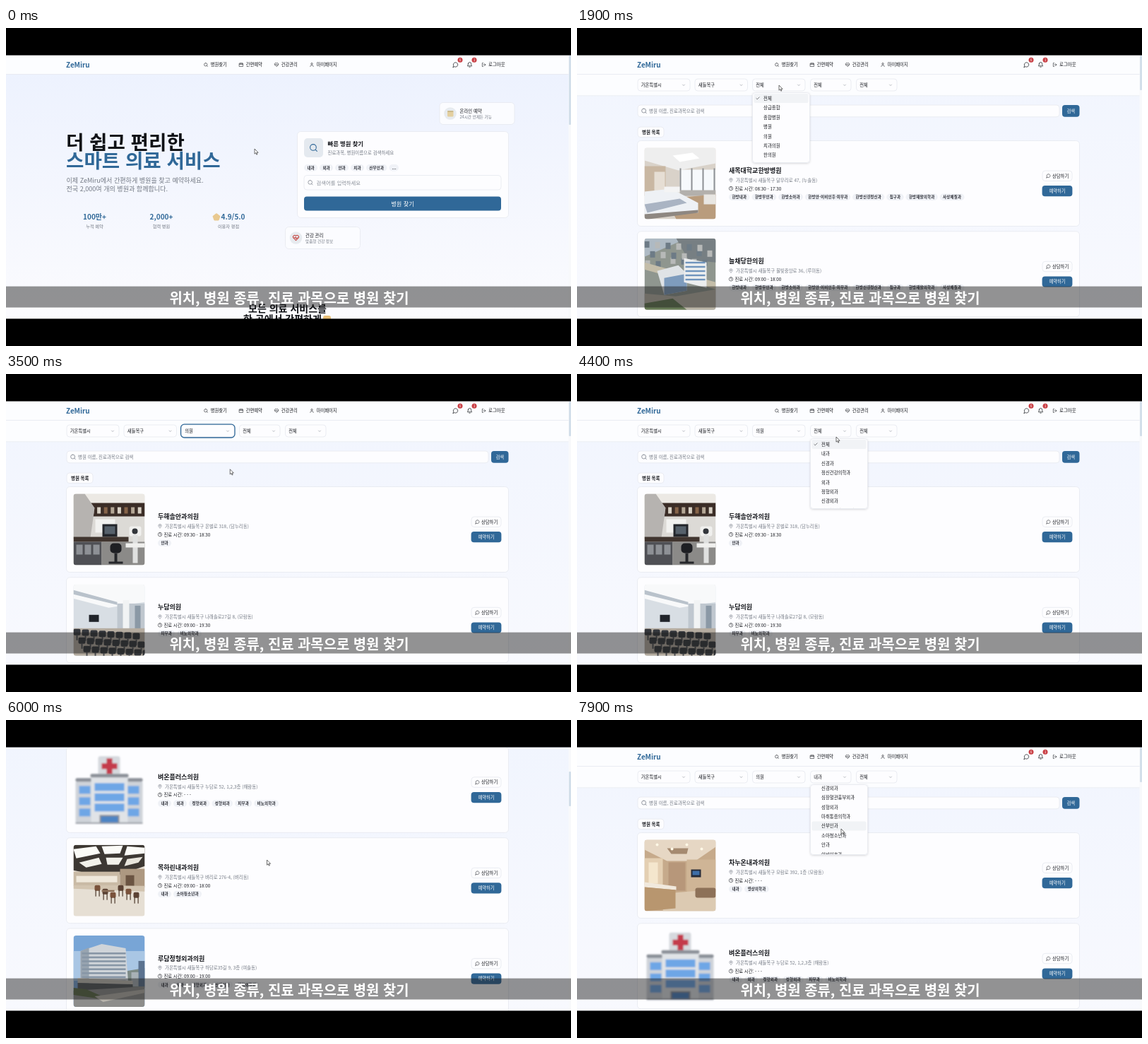
Write an HTML page that moves like this. It is 800 px wide and 450 px high and loops after 8 s.

```html
<!DOCTYPE html>
<html lang="ko">
<head>
<meta charset="utf-8">
<style>
html, body { margin: 0; width: 100%; height: 100%; overflow: hidden; background: #000 }
svg { display: block; font-family: "Noto Sans CJK KR", "Noto Sans CJK", "Noto Sans", sans-serif }
</style>
</head>
<body>
<svg id="stage" width="800" height="450" viewBox="0 0 800 450"></svg>
<script>
const BLUE = '#306898', INK = '#15171c', GREY = '#747a84', LINE = '#e6e9ef';
const PATHS = {
  search: 'M11 3a8 8 0 1 0 0 16a8 8 0 0 0 0-16M21 21l-4.3-4.3',
  cal: 'M3 5h18v16H3zM3 10h18M8 2v5M16 2v5',
  heart: 'M12 21L3 12A5.5 5.5 0 0 1 12 5A5.5 5.5 0 0 1 21 12ZM3 12h5l2-3 3 6 2-3h6',
  user: 'M12 3a4.5 4.5 0 1 0 0 9a4.5 4.5 0 0 0 0-9M4 21v-1a6 6 0 0 1 6-5h4a6 6 0 0 1 6 5v1',
  chat: 'M8 20A9 9 0 1 0 4 16L2 22Z',
  bell: 'M6 8a6 6 0 0 1 12 0c0 7 3 9 3 9H3s3-2 3-9M10 21h4',
  out: 'M9 21H4V3h5M16 17l5-5-5-5M21 12H9',
  clock: 'M12 2a10 10 0 1 0 0 20a10 10 0 0 0 0-20M12 6v6l4 2',
  pin: 'M12 22C7 17 4 13 4 10a8 8 0 0 1 16 0c0 3-3 7-8 12M12 7a3 3 0 1 0 0 6a3 3 0 0 0 0-6',
  down: 'M6 9l6 6 6-6',
  check: 'M4 12l5 5L20 6'
};

const rect = (x, y, w, h, fill, r = 0, more = '') =>
  `<rect x="${x}" y="${y}" width="${w}" height="${h}" rx="${r}" fill="${fill}" ${more}/>`;
const box = (x, y, w, h, r = 4, fill = '#fdfdff') => rect(x, y, w, h, fill, r, `stroke="${LINE}" stroke-width=".8"`);
const poly = (fill, pts) => `<polygon points="${pts}" fill="${fill}"/>`;
const disc = (x, y, r, fill) => `<circle cx="${x}" cy="${y}" r="${r}" fill="${fill}"/>`;
const text = (x, y, s, size, fill = INK, weight = 400, more = '') =>
  `<text x="${x}" y="${y}" font-size="${size}" fill="${fill}" font-weight="${weight}" ${more}>${s}</text>`;
const mid = (x, y, s, size, fill, weight) => text(x, y, s, size, fill, weight, 'text-anchor="middle"');
const icon = (name, x, y, size, color = INK, width = 2) =>
  `<path d="${PATHS[name]}" transform="translate(${x - size / 2} ${y - size / 2}) scale(${size / 24})" fill="none" stroke="${color}" stroke-width="${width}" stroke-linecap="round" stroke-linejoin="round"/>`;
const group = (id, body, more = '') => `<g id="${id}" ${more}>${body}</g>`;
const repeat = (n, f) => Array.from({ length: n }, (_, i) => f(i)).join('');

// Row of tags; each is as wide as its letters
function chips(names, x, y) {
  return names.map(s => {
    const w = [...s].reduce((n, c) => n + (c === '·' ? .28 : c === '.' ? .29 : .92), 0) * 5.7 + 8.6;
    const out = rect(x, y, w, 9.4, '#f0f2f7', 4.7) + text(x + 4.4, y + 6.6, s, 5.5, '#2a2c34', 700, 'letter-spacing=".17"');
    x += w + 2.9;
    return out;
  }).join('');
}

// Pictures, each on a 101 px square
const PICS = {
  ward: () => rect(0, 0, 101, 101, '#d9d2c9') + poly('#eeeeee', '0,0 101,0 101,22 48,32 0,18') +
    poly('#ffffff', '40,11 68,7 78,15 50,20') + rect(0, 26, 30, 42, '#c9b7a2') + rect(14, 34, 15, 36, '#e6ded4') +
    rect(50, 31, 51, 30, '#f6f9fc') + repeat(4, i => rect(50 + i * 16, 29, 2, 33, '#8c8f93')) +
    rect(50, 60, 51, 8, '#b3b0ac') + poly('#b99c7d', '30,72 101,66 101,101 45,101') +
    poly('#eef1f5', '0,62 38,58 76,78 76,92 0,96') + poly('#aab4c3', '0,80 50,72 60,78 4,92') +
    rect(28, 55, 22, 8, '#f4f4f4') + poly('#8e8781', '0,94 76,88 76,92 6,101 0,101') + rect(84, 66, 17, 14, '#e8e6e2'),
  city: () => rect(0, 0, 101, 101, '#8f968f') + poly('#aebac4', '0,0 60,0 0,26') + poly('#777f83', '45,0 101,0 101,34 62,30') +
    repeat(18, i => rect(i * 37 % 96, 4 + i * 23 % 34, 7, 9, i % 2 ? '#b7b9b8' : '#6d7b86')) +
    poly('#c4bda9', '0,34 101,62 101,72 0,44') + poly('#dfe3e6', '18,46 48,38 60,50 60,74 28,80') +
    poly('#7e9cbd', '28,56 60,50 60,74 28,80') + poly('#eceeef', '56,28 88,34 88,70 56,62') +
    repeat(5, i => rect(58, 33 + i * 6, 28, 2.4, '#6f94bd')) + poly('#b9b4a6', '0,78 44,82 101,72 101,101 0,101') +
    poly('#667a55', '0,92 40,85 60,101 0,101'),
  clinic: () => rect(0, 0, 101, 101, '#dcdad6') + rect(0, 0, 101, 14, '#ece9e4') + rect(20, 13, 81, 19, '#3b2d27') +
    repeat(8, i => rect(24 + i * 9.6, 19, 5, 9, ['#b3a695', '#d7d0c4', '#86644a'][i % 3])) +
    poly('#b6b3b0', '0,0 16,0 30,20 24,62 0,64') + rect(31, 36, 28, 19, '#f2f2f0') + rect(41, 43, 21, 18, '#23262b') +
    rect(44, 46, 15, 11, '#56616b') + rect(0, 61, 78, 7, '#40352f') + rect(0, 68, 40, 33, '#4f5055') +
    repeat(3, i => rect(4 + i * 12, 72, 9, 14, '#8e9196')) + rect(40, 68, 61, 33, '#8b8a88') +
    rect(52, 70, 16, 14, '#1e1f23', 5) + rect(58, 84, 4, 14, '#25262a') + rect(50, 96, 20, 3, '#25262a') +
    rect(79, 46, 17, 14, '#f0f0ee', 3) + rect(84, 58, 7, 40, '#dfe0df') + rect(74, 70, 27, 6, '#efefed') + disc(87, 53, 4, '#33363b'),
  waiting: () => rect(0, 0, 101, 101, '#d8dee4') + poly('#f8f9fa', '0,0 101,0 101,25 50,33 0,20') +
    poly('#b9c2cb', '0,8 62,25 62,29 0,14') + rect(62, 27, 39, 43, '#bfc7cf') + rect(70, 22, 9, 55, '#f1f3f4') +
    rect(87, 30, 8, 43, '#8b99a6') + rect(0, 62, 101, 39, '#b5aca0') + rect(22, 43, 14, 10, '#20242a') +
    repeat(3, j => repeat(8, i => rect(j * 7 + i * 12, 63 + j * 12 + i * .8, 10, 9, '#34373c', 2) +
      rect(j * 7 + i * 12 + 4, 71 + j * 12 + i, 2, 8, '#4a4c50'))),
  desk: () => rect(0, 0, 101, 101, '#c6aa8b') + poly('#e6d7c4', '0,0 101,0 101,10 72,30 32,30 0,14') +
    poly('#a58a70', '32,12 62,12 60,20 38,20') + repeat(4, i => disc(18 + i * 21, 7 + i % 2 * 6, 2, '#fff8e6')) +
    rect(0, 26, 26, 38, '#e4cfb2') + rect(6, 32, 13, 30, '#f4e6cd') + rect(34, 32, 24, 40, '#b7977a') +
    rect(60, 28, 41, 46, '#cfb596') + rect(66, 42, 14, 11, '#252b38') + rect(68, 44, 10, 6, '#3d6ea8') +
    poly('#dccab2', '30,76 101,70 101,101 26,101') + poly('#f1e9dd', '0,60 45,66 45,71 0,67') +
    poly('#b8966f', '0,67 44,71 44,97 0,101') + rect(72, 68, 29, 14, '#8d7158', 3),
  hospital: () => group('clinicArt', rect(35, 3, 31, 40, '#d6d9de', 3) + rect(47, 6, 8, 22, '#c43b4b') + rect(40, 13, 22, 8, '#c43b4b') +
    rect(3, 38, 95, 60, '#cfd3d9', 3) + rect(3, 34, 95, 5, '#8b9098', 2) + rect(25, 30, 52, 68, '#e0e3e7') + rect(24, 28, 54, 5, '#8b9098', 2) +
    repeat(3, i => rect(30, 41 + i * 14.5, 42, 11, '#6ea6e6') + rect(8, 45 + i * 16, 16, 11, '#6ea6e6') + rect(77, 45 + i * 16, 16, 11, '#6ea6e6')) +
    rect(37, 86, 28, 12, '#8b9098') + rect(39, 88, 24, 10, '#4e84c4') + rect(3, 96.5, 95, 2, '#9a9ea6'), 'filter="url(#soft)"'),
  lounge: () => rect(0, 0, 101, 101, '#e6dfd4') + poly('#3d3833', '0,0 101,0 101,30 66,42 30,42 0,36') +
    poly('#fbfbf7', '0,6 32,2 38,12 4,19') + poly('#fbfbf7', '40,2 70,1 66,12 44,13') + poly('#fbfbf7', '76,2 101,4 101,12 72,15') +
    poly('#f2f1ea', '8,25 36,18 40,27 18,32') + poly('#f2f1ea', '46,18 70,18 64,28 48,28') + poly('#e8e5dc', '76,20 98,17 92,25 72,30') +
    rect(0, 38, 66, 20, '#c9baa5') + rect(4, 44, 58, 9, '#efe8db') + rect(66, 34, 35, 26, '#ad9881') +
    rect(74, 43, 12, 16, '#6b5442') + poly('#d2c4b0', '0,57 101,58 101,66 0,62') +
    repeat(6, i => { const x = 30 + i * 11, y = 57 + i % 3 * 5;
      return rect(x, y, 8, 8, i % 2 ? '#5b4234' : '#7a523b', 2) + rect(x + 1, y + 7, 1.2, 9, '#4d3a2d') + rect(x + 6, y + 7, 1.2, 9, '#4d3a2d'); }) +
    rect(40, 64, 18, 2.5, '#8b6e57'),
  tower: () => rect(0, 0, 101, 101, '#78a5d6') + rect(0, 22, 101, 42, '#a9c6e4') + poly('#7d8a86', '76,50 101,46 101,74 76,74') +
    poly('#cfd4d9', '10,22 40,12 74,18 78,72 10,72') + poly('#98a4b0', '10,22 22,17 22,72 10,72') +
    repeat(8, i => rect(12, 24 + i * 5.6, 62, 2.6, '#8796a6')) + rect(92, 36, 9, 36, '#5c7390') +
    rect(82, 52, 10, 20, '#a8b0b6') + poly('#c5c0b8', '6,60 84,64 84,69 6,67') + poly('#55575a', '6,67 84,69 84,79 6,78') +
    poly('#8d8d8b', '0,78 101,72 101,101 0,101') + poly('#5d6c49', '0,74 18,76 54,92 0,84') +
    poly('#b8b4ac', '30,86 101,76 101,81 42,94'),
  office: () => rect(0, 0, 101, 101, '#d5d5d0') + rect(56, 11, 15, 3, '#ffffff', 1) + poly('#bfc2be', '0,4 30,16 0,20') + rect(0, 40, 101, 61, '#b9ac9b')
};

const CITY = '가온특별시 새들목구 ';
const ORIENTAL = ['한방내과', '한방부인과', '한방소아과', '한방안·이비인후·피부과', '한방신경정신과', '침구과', '한방재활의학과', '사상체질과'];
const LISTS = [
  [['ward', '새목대학교한방병원', '달무리로 47, (누솔동)', '08:30 - 17:30', ORIENTAL],
   ['city', '늘채당한의원', '물빛중앙로 36, (루미동)', '09:00 - 18:00', ORIENTAL]],
  [['clinic', '두해솔안과의원', '온별로 318, (담누리동)', '09:30 - 18:30', ['안과']],
   ['waiting', '누담의원', '나래솔로27길 8, (모람동)', '09:00 - 19:30', ['피부과', '비뇨의학과']]],
  [['desk', '차누온내과의원', '모람로 392, 1층 (모람동)', '- - -', ['내과', '영상의학과']],
   ['hospital', '벼온플러스의원', '누담로 52, 1,2,3층 (해람동)', '- - -', ['내과', '외과', '정형외과', '성형외과', '피부과', '비뇨의학과']],
   ['lounge', '목하린내과의원', '벼리로 276-4, (벼리동)', '09:00 - 18:00', ['내과', '소아청소년과']],
   ['tower', '루담정형외과의원', '하담로35길 9, 3층 (여솔동)', '09:00 - 19:00', ['내과', '외과', '정형외과', '신경외과', '재활의학과']],
   ['office', '', '', '- - -', []]]
];

function card([pic, name, street, hours, tags], i) {
  return `<g transform="translate(0 ${159.5 + i * 128.3})">` + box(85.5, 0, 626, 121, 5) +
    `<g transform="translate(95.5 10)" clip-path="url(#round)">${PICS[pic]()}</g>` +
    text(215, 45.6, name, 9, INK, 700) +
    icon('pin', 218, 55.7, 6.6, GREY) + text(225, 58.2, CITY + street, 6.45, GREY) +
    icon('clock', 218, 67.5, 6.6) + text(223.5, 70, '진료 시간: ' + hours, 6.3) + chips(tags, 215, 75) +
    box(659, 42.5, 42, 14.5) + icon('chat', 667.5, 49.7, 6.5) + text(673, 52, '상담하기', 6.3, INK, 500) +
    rect(658.6, 63.6, 42.8, 15.2, BLUE, 4) + mid(680, 73.5, '예약하기', 6.3, '#fff', 500) + '</g>';
}

const header = () => rect(0, 38, 797, 27.5, '#fcfdff') + rect(0, 65.2, 797, .8, LINE) +
  text(85, 56.2, 'ZeMiru', 9.9, BLUE, 700) + rect(275, 44, 43.5, 16, '#eef1f7', 4, 'id="hover"') +
  [['search', 283, '병원찾기'], ['cal', 333, '간편예약'], ['heart', 383, '건강관리'], ['user', 433, '마이페이지']]
    .map(([n, x, s]) => icon(n, x, 52, 6.6) + text(x + 6.7, 54.4, s, 6.3, INK, 500)).join('') +
  icon('chat', 636.5, 52, 8.5) + icon('bell', 656.5, 52, 8.5) +
  [[643, 6], [663, 1]].map(([x, n]) => disc(x, 45.3, 3.5, '#c93f45') + mid(x, 47.1, n, 4.8, '#fff', 500)).join('') +
  icon('out', 676.5, 52, 6.6) + text(683, 54.4, '로그아웃', 6.4, INK, 500);

const float = (x, y, title, sub, art) => box(x, y, 106, 31, 5, '#fbfcff') + disc(x + 15, y + 15.5, 8.8, '#e7ebef') + art +
  text(x + 28.5, y + 14.4, title, 6.4, INK, 500) + text(x + 28.5, y + 22, sub, 5.6, GREY);

const home = () => rect(0, 65, 797, 347, 'url(#sky)') +
  text(85, 172, '더 쉽고 편리한', 27.6, '#101216', 700) + text(85, 197.8, '스마트 의료 서비스', 27.6, BLUE, 700) +
  text(85.5, 219, '이제 ZeMiru에서 간편하게 병원을 찾고 예약하세요.', 9.05, GREY) +
  text(85.5, 230.5, '전국 2,000여 개의 병원과 함께합니다.', 9.05, GREY) +
  [[125.5, '100만+', '누적 예약', 0], [220, '2,000+', '협력 병원', 0], [315, '4.9/5.0', '이용자 평점', 6.5]]
    .map(([x, n, s, dx]) => mid(x + dx, 271, n, 10, BLUE, 700) + mid(x, 283, s, 6.2, GREY, 400)).join('') +
  `<path d="M298 263.4l4.2 3.2-1.6 4.6h-5.2l-1.6-4.6z" fill="#e9c990" stroke="#e9c990" stroke-width="2.4" stroke-linejoin="round"/>` +
  box(412.5, 146.5, 299, 122, 5) + rect(422, 156, 27, 27, '#e4e9ef', 5) + icon('search', 435.5, 169.5, 13, BLUE) +
  text(455.5, 167.3, '빠른 병원 찾기', 8.3, INK, 700) + text(455.5, 178.6, '진료과목, 병원이름으로 검색하세요', 6.4, GREY) +
  chips(['내과', '외과', '안과', '치과', '산부인과', '...'], 422, 193) +
  box(422, 208.5, 279, 20.5) + icon('search', 431, 218.7, 8.5, GREY) + text(439.5, 221.5, '검색어를 입력하세요', 7.3, '#8a9099') +
  rect(422, 238.5, 279, 20, BLUE, 4) + mid(561.5, 251.5, '병원 찾기', 8.2, '#fff', 500) +
  float(614, 105.5, '온라인 예약', '24시간 언제든 가능', rect(625, 117, 8.5, 8.5, '#e3cf9f', 1.5) + rect(625, 117, 8.5, 2, '#cbb98c', 1)) +
  float(395.5, 281.5, '건강 관리', '맞춤형 건강 정보', icon('heart', 410.5, 297, 9.5, '#c5443f', 2.6)) +
  mid(398.5, 402.3, '모든 의료 서비스를', 14, '#101216', 700) + text(336, 416.5, '한 곳에서 간편하게', 14, '#101216', 700) +
  rect(449, 407, 11, 7, '#e8bf76', 3);

const FILTERS = [[86, 74], [167, 74.5], [248.5, 74.5], [330.5, 57.5], [395.5, 57.5]];
const filters = () => rect(0, 66, 797, 30, '#fcfdff') + rect(0, 95.5, 797, .7, LINE) +
  FILTERS.map(([x, w], i) => box(x, 72, w, 17) +
    text(x + 4.8, 83.1, ['가온특별시', '새들목구', '전체', '전체', '전체'][i], 6.3, INK, 500, `id="value${i}"`) +
    icon('down', x + w - 9, 80.8, 6, GREY)).join('') +
  [2, 3].map(i => rect(FILTERS[i][0] - 1, 71.2, FILTERS[i][1] + 2, 18.8, 'none', 5, `id="ring${i}" stroke="${BLUE}" stroke-width="1.3"`)).join('');

const search = () => box(86, 109, 597, 16.8) + icon('search', 95, 117.4, 9, GREY) +
  text(102, 119.8, '병원 이름, 진료과목으로 검색', 6.45, GREY) + rect(687, 109, 24.5, 16.8, BLUE, 4) + mid(699.2, 119.7, '검색', 6.3, '#fff', 500) +
  box(86, 140, 37, 14.6) + text(92, 149.8, '병원 목록', 6.4, INK, 700);

const menu = (id, x, items) => group(id, box(x, 91.5, 81, 99, 4) +
  `<g clip-path="url(#menu)"><rect id="${id}Row" x="${x + 2}" width="77" height="13" rx="2" fill="#f1f3f6"/>` +
  group(id + 'Items', items.map((s, i) => text(x + 15.5, 101.9 + i * 13.4, s, 6.4, INK, 500)).join('') +
    group(id + 'Check', icon('check', x + 7.5, 99.5, 6.5))) + '</g>', 'filter="url(#shade)"');

const KINDS = ['전체', '상급종합', '종합병원', '병원', '의원', '치과의원', '한의원'];
const FIELDS = ['전체', '내과', '신경과', '정신건강의학과', '외과', '정형외과', '신경외과', '심장혈관흉부외과', '성형외과', '마취통증의학과', '산부인과', '소아청소년과', '안과', '이비인후과', '피부과'];

stage.innerHTML = `<defs>
  <linearGradient id="sky" x2="0" y2="1"><stop stop-color="#edf2fe"/><stop offset="1" stop-color="#fbfbfe"/></linearGradient>
  <linearGradient id="mist" x2="0" y2="1"><stop stop-color="#f1f5fe"/><stop offset="1" stop-color="#f8f9fe"/></linearGradient>
  <clipPath id="round"><rect width="101" height="101" rx="4"/></clipPath>
  <clipPath id="menu"><rect x="240" y="92" width="180" height="98"/></clipPath>
  <filter id="soft"><feGaussianBlur stdDeviation=".8"/></filter>
  <filter id="shade"><feDropShadow dx="0" dy="1" stdDeviation="1.5" flood-opacity=".15"/></filter></defs>` +
  rect(0, 38, 800, 374, 'url(#mist)') +
  group('page', group('home', home()) + header() +
    group('finder', filters() + search() + LISTS.map((l, i) => group('list' + i, l.map(card).join(''))).join('') +
      menu('kind', 248.5, KINDS) + menu('field', 330.5, FIELDS))) +
  rect(796.5, 38, 3.5, 374, '#f8f9fb') + rect(797, 39, 3, 49, '#d3dfea', 1, 'id="thumb"') +
  rect(0, 365.6, 800, 29.9, 'rgba(30,30,30,.48)') + mid(401, 389.7, '위치, 병원 종류, 진료 과목으로 병원 찾기', 19.9, '#fff', 700) +
  group('cursor', '<path d="M0 0v7.2l1.7-1.5 1.1 2.5 1.1-.4-1.1-2.5h2.3z" fill="#fff" stroke="#333" stroke-width=".7"/>') +
  rect(0, 0, 800, 38.6, '#000') + rect(0, 411.4, 800, 39, '#000');

const $ = id => document.getElementById(id);
const show = (id, on) => $(id).setAttribute('display', on ? 'inline' : 'none');
const move = (id, x, y) => $(id).setAttribute('transform', `translate(${x} ${y})`);

// Eased value of column c between keys [time, ...values]
function at(keys, t, c = 1) {
  const i = keys.findIndex(k => k[0] > t);
  if (i < 0) return keys[keys.length - 1][c];
  if (!i) return keys[0][c];
  const a = keys[i - 1], b = keys[i], p = (t - a[0]) / (b[0] - a[0]);
  return a[c] + (b[c] - a[c]) * p * p * (3 - 2 * p);
}

const MOUSE = [[0, 352, 171], [200, 352, 171], [650, 297, 52], [850, 297, 53], [1100, 294, 69], [1650, 286, 80], [1900, 286, 81],
  [2450, 292, 155], [2800, 292, 160], [3250, 293, 161], [3900, 366, 82], [4150, 366, 83], [4400, 367, 89], [4650, 368, 113],
  [4900, 368, 113], [5400, 369.5, 198], [6900, 369.5, 198], [7250, 362, 82], [7400, 362, 83], [7600, 373, 130], [7900, 374, 154]];
const SCROLL = [[4950, 0], [5500, 290.8], [5750, 290.8], [6400, 166.3], [7050, 0]];
const MENU_SCROLL = [[7550, 0], [7850, 83.5]];
const SHOWN = [[900, 2600], [2680, 4700], [4800, 8000]];

function row(id, mouseY, shift, chosen) {
  const i = Math.max(0, Math.round((mouseY + shift - 99.5) / 13.4));
  $(id + 'Row').setAttribute('y', 93 + i * 13.4 - shift);
  move(id + 'Items', 0, -shift);
  move(id + 'Check', 0, chosen * 13.4);
}

function draw(now) {
  const t = now % 8000, x = at(MOUSE, t), y = at(MOUSE, t, 2), scroll = at(SCROLL, t), list = t >= 800;
  show('home', !list);
  show('finder', list);
  show('hover', t > 600 && t < 1180);
  SHOWN.forEach(([from, to], i) => {
    const k = Math.min(1, (t - from) / 400);
    show('list' + i, k > 0 && t < to);
    $('list' + i).setAttribute('opacity', Math.max(0, k));
    move('list' + i, 0, 8.6 * (1 - k));
  });
  show('kind', t > 1880 && t < 2580);
  show('field', t > 4180 && t < 4680 || t > 7380);
  show('ring2', t >= 2580 && t < 4150);
  show('ring3', t >= 4680 && t < 7380);
  $('value2').textContent = t < 2580 ? '전체' : '의원';
  $('value3').textContent = t < 4680 ? '전체' : '내과';
  row('kind', y, 0, 0);
  row('field', y, at(MENU_SCROLL, t), t < 4680 ? 0 : 1);
  move('page', 0, -scroll);
  $('thumb').setAttribute('y', 39 + scroll * .136);
  $('thumb').setAttribute('height', list ? 49 : 98);
  move('cursor', x, y);
}

const start = performance.now();
function loop() {
  draw(performance.now() - start);
  requestAnimationFrame(loop);
}
loop();
</script>
</body>
</html>
```
